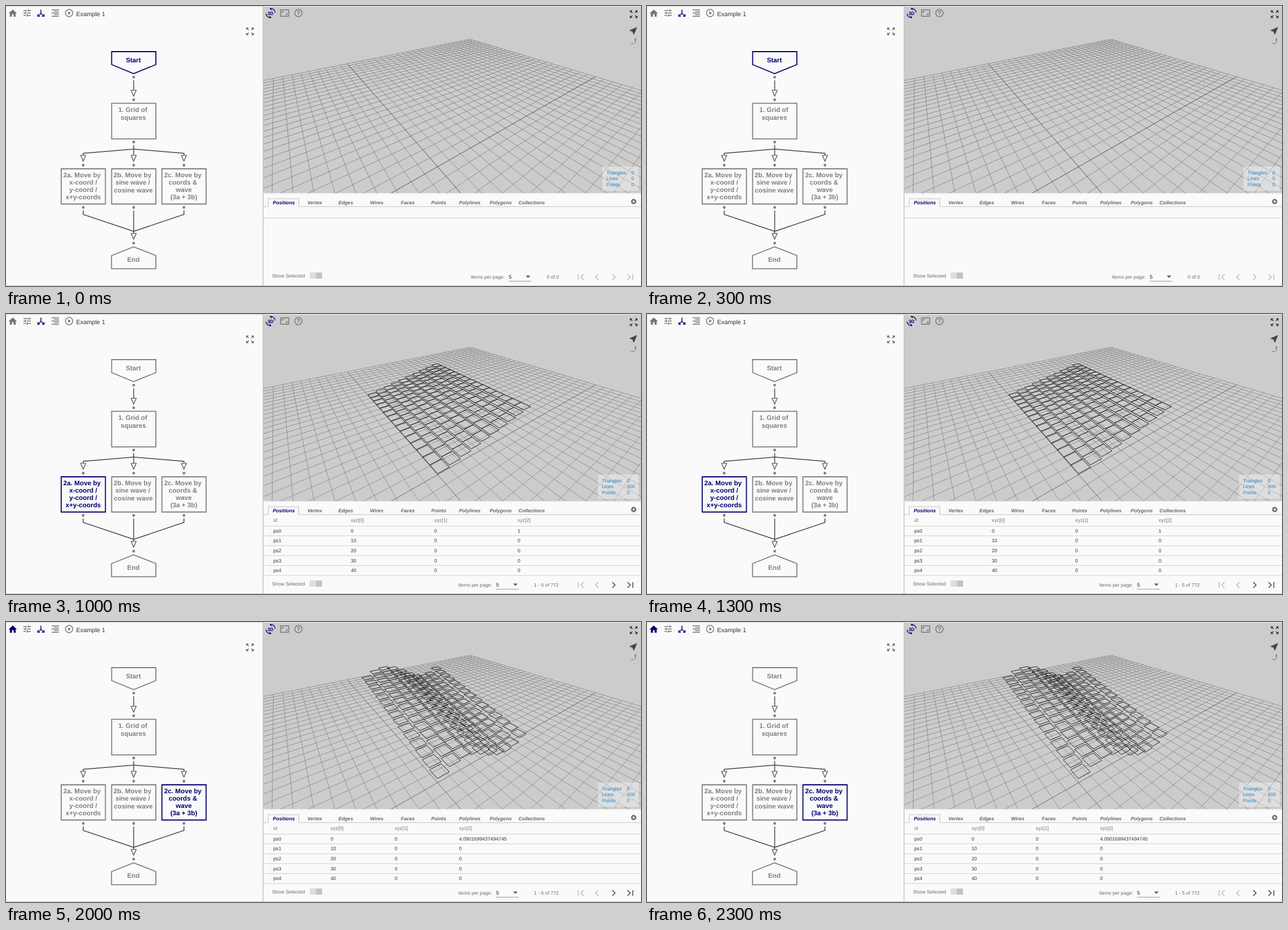
An HTML page for the animation above (2500 ms loop, 1127x497 px).

```html
<!DOCTYPE html>
<html lang="en">
<head>
<meta charset="utf-8">
<title>Grid of squares</title>
<style>
  html, body { margin: 0; width: 100%; height: 100%; overflow: hidden; background: #fafafa; }
  svg { display: block; }
  text { font-family: "Liberation Sans", Arial, sans-serif; text-rendering: geometricPrecision; }
</style>
</head>
<body>
<svg id="stage" width="1127" height="497" viewBox="0 0 1127 497"></svg>
<script>
const STEP = 500;
const NAVY = '#00006c', GRAY = '#808080', DARK = '#484848', TEXT = '#6c6c6c';

// ---- markup helpers ----
const line = (pts, color = DARK, w = 1.5) =>
  `<polyline points="${pts}" fill="none" stroke="${color}" stroke-width="${w}"/>`;
const rect = (x, y, w, h, fill) => `<rect x="${x}" y="${y}" width="${w}" height="${h}" fill="${fill}"/>`;
const text = (x, y, str, size = 8.8, fill = TEXT, extra = '') =>
  `<text x="${x}" y="${y}" font-size="${size}" fill="${fill}" ${extra}>${str.replace('&', '&amp;')}</text>`;
const MID = 'text-anchor="middle"';
const icon = (x, y, d, fill = '#757575', s = 0.72) =>
  `<path transform="translate(${x} ${y}) scale(${s}) translate(-12 -12)" d="${d}" fill="${fill}"/>`;
const stroke = (d, color, w) => `<path d="${d}" fill="none" stroke="${color}" stroke-width="${w}"/>`;

const RING = 'M12 2C6.48 2 2 6.48 2 12s4.48 10 10 10 10-4.48 10-10S17.52 2 12 2zm0 18c-4.41 0-8-3.59-8-8s3.59-8 8-8 8 3.59 8 8-3.59 8-8 8z';
const ICONS = {
  home: 'M10 20v-6h4v6h5v-8h3L12 3 2 12h3v8z',
  tune: 'M3 17v2h6v-2H3zM3 5v2h10V5H3zm10 16v-2h8v-2h-8v-2h-2v6h2zM7 9v2H3v2h4v2h2V9H7zm14 4v-2H11v2h10zm-6-4h2V7h4V5h-4V3h-2v6z',
  list: 'M3 21h18v-2H3zm6-4h12v-2H9zm-6-4h18v-2H3zm6-4h12V7H9zM3 3v2h18V3z',
  play: 'M10 16.5l6-4.5-6-4.5z' + RING,
  expand: 'M15 3l2.3 2.3-2.9 2.9 1.4 1.4L18.7 6.7 21 9V3zM3 9l2.3-2.3 2.9 2.9 1.4-1.4L6.7 5.3 9 3H3zm6 12l-2.3-2.3 2.9-2.9-1.4-1.4-2.9 2.9L3 15v6zm12-6l-2.3 2.3-2.9-2.9-1.4 1.4 2.9 2.9L15 21h6z',
  ratio: 'M19 12h-2v3h-3v2h5zM7 9h3V7H5v5h2zm14-6H3c-1.1 0-2 .9-2 2v14c0 1.1.9 2 2 2h18c1.1 0 2-.9 2-2V5c0-1.1-.9-2-2-2zm0 16H3V5h18z',
  arrow: 'M21 3L3 10.5v1l6.8 2.6L12.5 21h1z'
};

// ---- perspective view, z up ----
const VIEW = { cx: 792, cy: 167.5, f: 360, x: -50, y: -82.8, z: 109.4 };
const YAW = 37.05 * Math.PI / 180, PITCH = 30.55 * Math.PI / 180;
const [sy, cy, sp, cp] = [Math.sin(YAW), Math.cos(YAW), Math.sin(PITCH), Math.cos(PITCH)];

function toCamera([x, y, z]) {
  const dx = x - VIEW.x, dy = y - VIEW.y, dz = z - VIEW.z;
  const ahead = sy * dx + cy * dy;
  return [cy * dx - sy * dy, ahead * sp + dz * cp, ahead * cp - dz * sp];
}

function segment(a, b) {
  const near = 5;
  let p = toCamera(a), q = toCamera(b);
  if (p[2] < near && q[2] < near) return '';
  if (p[2] > q[2]) [p, q] = [q, p];
  if (p[2] < near) {
    const k = (near - p[2]) / (q[2] - p[2]);
    p = p.map((v, i) => v + (q[i] - v) * k);
  }
  const px = ([r, u, d]) => (VIEW.cx + VIEW.f * r / d).toFixed(1) + ' ' + (VIEW.cy - VIEW.f * u / d).toFixed(1);
  return `M${px(p)}L${px(q)}`;
}

function floor(axisColor, gridColor) {
  const R = 250;
  let grid = '', axes = '';
  for (let c = -R; c <= R; c += 10) {
    const d = segment([c, -R, 0], [c, R, 0]) + segment([-R, c, 0], [R, c, 0]);
    if (c) grid += d; else axes += d;
  }
  return stroke(grid, gridColor, 0.9) + stroke(axes, axisColor, 1);
}

// 10 x 15 squares, each lifted by the height at its centre
function squares(height) {
  let d = '';
  for (let x = 0; x < 100; x += 10) {
    for (let y = 0; y < 150; y += 10) {
      const z = height(x + 5, y + 5);
      const c = [[x, y, z], [x + 10, y, z], [x + 10, y + 10, z], [x, y + 10, z]];
      c.forEach((p, i) => { d += segment(p, c[(i + 1) % 4]); });
    }
  }
  return stroke(d, '#222', 1);
}

// Flat squares lie in the floor plane, so the axes cover their two outer edges
function flatSquares() {
  let d = '';
  for (let x = 10; x <= 100; x += 10) d += segment([x, x < 100 ? 0 : 8, 0], [x, 150, 0]);
  for (let y = 10; y <= 150; y += 10) d += segment([0, y, 0], [100, y, 0]);
  return stroke(d, '#222', 1.1);
}

const wave = x => 10 * Math.sin(2 * Math.PI * x / 100);

// ---- flowchart ----
const box = (x, y, b) => `${x},${y} ${x + 78.5},${y} ${x + 78.5},${b} ${x},${b}`;
const NODES = [
  { pts: '187.5,81 266,81 266,104 226.5,120 187.5,104', rows: [[226, 100, 'Start']] },
  { pts: box(187.5, 172.7, 235.8), rows: [[225, 188, '1. Grid of'], [226, 201.5, 'squares']] },
  { pts: box(98, 289, 351.5), rows: [[135, 303.5, '2a. Move by'], [137, 317, 'x-coord /'], [137, 330, 'y-coord /'], [137, 343, 'x+y-coords']] },
  { pts: box(187.5, 289, 351.5), rows: [[224.5, 303.5, '2b. Move by'], [225, 317, 'sine wave /'], [226, 330.5, 'cosine wave']] },
  { pts: box(276.7, 289, 351.5), rows: [[314, 303.5, '2c. Move by'], [314, 317, 'coords &'], [315.5, 330, 'wave'], [315.5, 343, '(3a + 3b)']] },
  { pts: '187.3,443 226.5,427.5 266,443 266,466.3 187.3,466.3', rows: [[226, 454, 'End']] }
];
const node = ({ pts, rows }, on) => {
  const color = on ? NAVY : GRAY;
  return `<polygon points="${pts}" fill="none" stroke="${color}" stroke-width="1.8"/>` +
    rows.map(([x, y, s]) => text(x, y, s, 11.7, color, MID + ' font-weight="bold"')).join('');
};
const dot = (x, y) => `<circle cx="${x}" cy="${y}" r="2.4" fill="${GRAY}"/>`;
const tip = (x, y) => `<path d="M${x - 4.5} ${y}h9l-4.5 10.5z" fill="#fafafa" stroke="${DARK}" stroke-width="1.2"/>`;

function wires() {
  const [L, M, R] = [137, 226.6, 315.8];
  let s = line(`${M},132 ${M},150`) + tip(M, 149.5) + line(`${M},247 ${M},266`);
  for (const x of [L, R]) {
    s += line(`${M},254 ${x},261.5 ${x},265`) + line(`${x},363 ${x},370 ${M},400`);
  }
  s += line(`${M},363 ${M},404`) + tip(M, 403.5);
  for (const x of [L, M, R]) s += tip(x, 265) + dot(x, 282.5) + dot(x, 357.5);
  return s + [126.3, 166.5, 241.5, 421].map(y => dot(M, y)).join('');
}

// ---- fixed parts of the screen ----
function leftPane() {
  return rect(0, 0, 1127, 497, '#fafafa') + rect(0, 0, 457, 1, '#ccc') + rect(0, 496, 1127, 1, '#c6c6c6') +
    icon(37.5, 12.5, ICONS.tune) + icon(87.5, 12.5, ICONS.list) + icon(112, 12.5, ICONS.play) +
    stroke('M62 6.5V13L57.5 17.2M62 13L66.5 17.2M56.5 14.5V18.2H60M67.5 14.5V18.2H64', NAVY, 1.5) +
    text(124.5, 17.5, 'Example 1', 10.9, '#333') + icon(433, 45, ICONS.expand, '#666', 0.75) + wires();
}

function viewIcons() {
  return stroke('M468.5 4.2A8.3 8.3 0 0 1 477.7 11.5M470.5 20.7A8.3 8.3 0 0 1 461.3 13.5M471.5 7L468.5 4.2M467.5 18L470.5 20.7', NAVY, 1.4) +
    text(469.4, 15.5, '3D', 8.2, NAVY, MID + ' font-weight="bold"') +
    icon(494.5, 12.5, ICONS.ratio) + icon(519, 12.5, RING) +
    text(519, 16.3, '?', 10.5, '#757575', MID + ' font-weight="bold"') +
    icon(1114, 14.5, ICONS.expand, '#333', 0.75) + icon(1113.5, 44, ICONS.arrow, '#444', 0.75) +
    text(1114, 65, '_f', 10.5, '#444', MID);
}

const TABS = ['Positions', 'Vertex', 'Edges', 'Wires', 'Faces', 'Points', 'Polylines', 'Polygons', 'Collections'];
function dataPane() {
  let s = rect(455.6, 0, 1.4, 497, '#c0c0c0') + rect(457, 332, 670, 2, '#f0f0f0');
  TABS.forEach((name, i) => {
    s += text(493 + i * 55, 352, name, 8.7, i ? '#666' : NAVY, MID + ' font-weight="bold" font-style="italic"');
  });
  s += line('457,356 465.5,356 465.5,342 519.5,342 519.5,356 1127,356', '#bdbdbd', 1) +
    line('457,376.5 1127,376.5', '#d2d2d2', 1);
  s += `<circle cx="1114" cy="347" r="2.9" fill="none" stroke="#666" stroke-width="2"/>` +
    `<circle cx="1114" cy="347" r="4.4" fill="none" stroke="#666" stroke-width="1.4" stroke-dasharray="1.75 1.7"/>`;
  return s + text(472, 482, 'Show Selected') + rect(539, 473, 11, 11, '#dcdce9') + rect(550, 473, 11, 11, '#c4c4c4');
}

// ---- parts that change ----
const STATES = [
  { shape: () => '' },
  { shape: flatSquares, cols: [612, 760, 908], z0: '0', total: 176 },
  { shape: () => squares(x => x / 5), cols: [612, 760, 908], z0: '1', total: 772 },
  { shape: () => squares(wave), cols: [579, 695.5, 811.5], z0: '3.090169943749474', total: 772, hover: true },
  { shape: () => squares((x, y) => wave(x) + y / 5), cols: [576, 690, 804], z0: '4.0901699437494745', total: 772, hover: true }
];

function stats(full) {
  const x = full ? 1050.5 : 1058.5;
  const rows = [['Triangles', '0'], ['Lines', full ? '600' : '0'], ['Points', '0']];
  return rect(x, 285, 1123 - x, 43, 'rgba(255,255,255,.35)') + rows.map(([name, n], i) => {
    const y = 299.3 + i * 10.1;
    return text(x + 7.3, y, name, 8.6, '#1f83c6') + text(x + 51.5, y, n, 8.6, '#1f83c6');
  }).join('');
}

function table({ cols, z0 }) {
  let s = text(474.5, 369.3, 'id', 8.8, '#757575') +
    cols.map((x, i) => text(x, 369.3, `xyz[${i}]`, 8.8, '#757575')).join('');
  for (let r = 0; r < 5; r++) {
    const y = 387.7 + r * 17.6;
    const cells = [`${r * 10}`, '0', r ? '0' : z0];
    s += text(474.5, y, 'ps' + r, 8.7, '#333') + cells.map((c, i) => text(cols[i], y, c, 8.7, '#333')).join('') +
      line(`457,${y + 6} 1127,${y + 6}`, '#d0d0d0', 1);
  }
  return s;
}

function pager(total) {
  const x = total ? 802.5 : 825, on = total ? '#444' : '#b8b8b8', off = '#b8b8b8';
  return text(x, 483.7, 'Items per page:', 8.7) + text(x + 67.3, 483.8, '5', 9.3, '#222') +
    `<path d="M${x + 97.5} 478.5h8l-4 4z" fill="#555"/>` + line(`${x + 67},488.5 ${x + 107.5},488.5`, '#999', 1) +
    text(x + 134.5, 483.7, total ? `1 - 5 of ${total}` : '0 of 0', 8.7) +
    line('1015.5,476 1015.5,486', off) + line('1025,476 1020,481 1025,486', off) +
    line('1051.5,476 1046.5,481 1051.5,486', off) + line('1076,476 1081,481 1076,486', on) +
    line('1103,476 1108,481 1103,486', on) + line('1112.5,476 1112.5,486', on);
}

function scene(state, i) {
  const full = !!state.total;
  return `<g class="scene" display="none">` +
    icon(12, 13, ICONS.home, state.hover ? NAVY : '#757575', 0.74) +
    NODES.map((n, k) => node(n, k === i)).join('') +
    `<svg x="457" y="1" width="670" height="331" viewBox="457 1 670 331">` +
    rect(457, 1, 670, 331, '#ccc') +
    floor(full ? '#686868' : '#505050', full ? '#8c8c8c' : '#868686') + state.shape() + stats(full) + viewIcons() + '</svg>' +
    (full ? table(state) : '') + pager(state.total) + '</g>';
}

const stage = document.getElementById('stage');
stage.innerHTML = leftPane() + dataPane() + STATES.map(scene).join('');
const scenes = [...stage.querySelectorAll('.scene')];

const start = performance.now();
let shown = -1;
function show(now) {
  const i = Math.floor(Math.max(0, now - start) / STEP) % scenes.length;
  if (i !== shown) {
    scenes.forEach((g, k) => g.setAttribute('display', k === i ? 'inline' : 'none'));
    shown = i;
  }
  requestAnimationFrame(show);
}
show(start);
</script>
</body>
</html>
```
